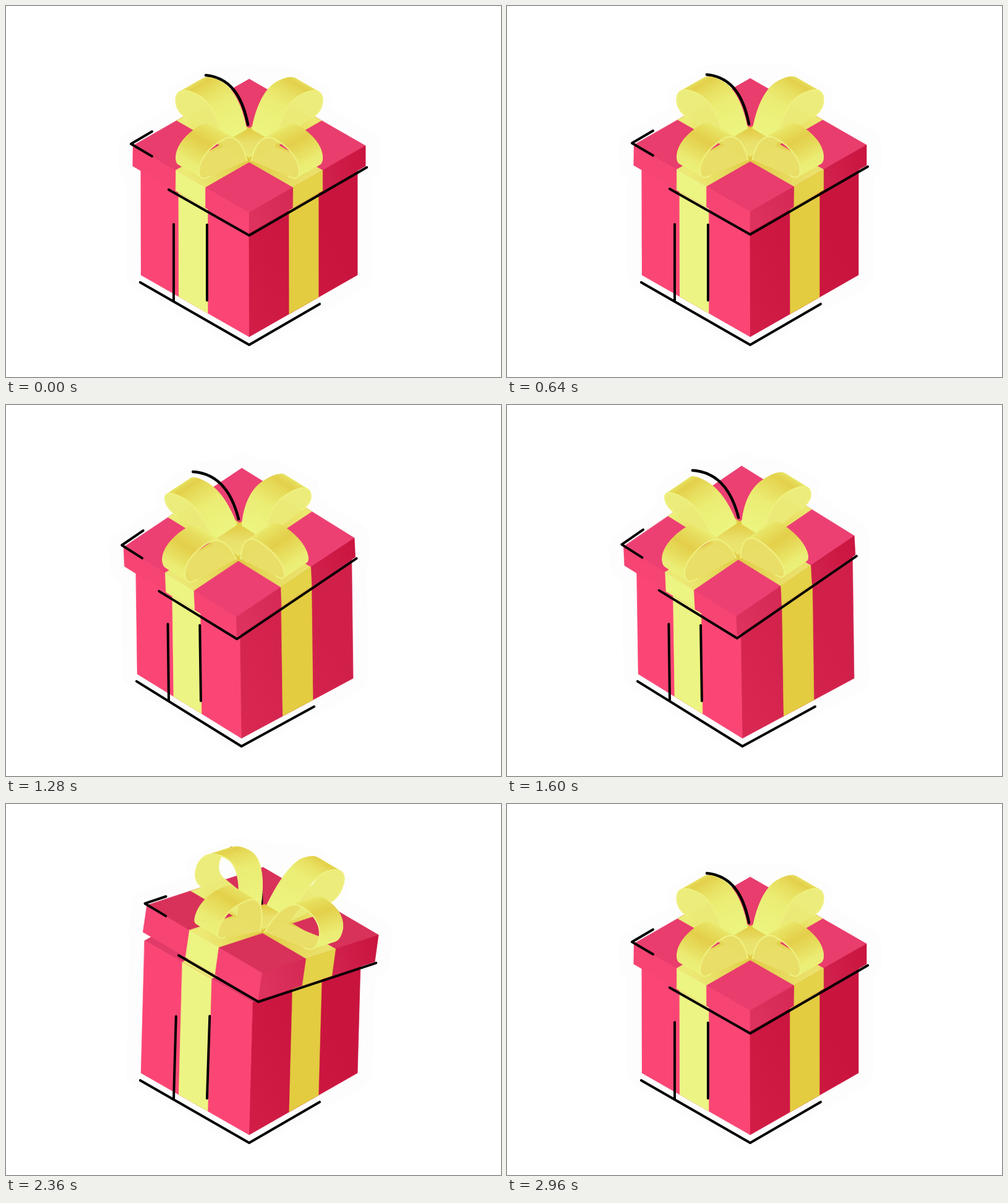
Animation of 800x600 px, one loop 3000 ms. Source, as an HTML page with a canvas:

```html
<!DOCTYPE html>
<html>
<head>
<meta charset="utf-8">
<title>Gift box</title>
<style>
html, body { margin: 0; width: 100%; height: 100%; overflow: hidden; background: #fff; }
canvas { display: block; }
</style>
</head>
<body>
<canvas id="stage" width="800" height="600"></canvas>
<script>
const ctx = document.getElementById('stage').getContext('2d');
const LOOP = 3000, STEP = 40;

// Lid pose: back corner, edge to the right, edge to the left, drop of the side, unit of height
const REST = [393, 118, 188, 108, -188, 108, 0, 33, 0, -1];
const TURN = [0, 4, -7, 5, -5, -3, 0, 0, -.05, 0];
const LIFT = [0, -68, 0, -15, 0, -10, 0, 1, -.06, 0];
const LEFT = [-12, -20, 1, 0, 2, 23, 1.5, -2, -.1, .08];
const RIGHT = [12, -7, -1, 1, 0, -31, -4, 7, .25, -.09];

const mix = (a, b, k) => a + (b - a) * k;
const ease = (t, a, b) => (1 - Math.cos(Math.PI * Math.min(1, Math.max(0, (t - a) / (b - a))))) / 2;
const bump = (t, a, peak, b) => t < peak ? ease(t, a, peak) : 1 - ease(t, peak, b);
const rgb = c => `rgb(${c.map(Math.round)})`;

function trace(points, close = true) {
  ctx.beginPath();
  points.forEach(p => ctx.lineTo(p[0], p[1]));
  if (close) ctx.closePath();
}
function fill(points, color, seam = .6) {
  trace(points);
  ctx.fillStyle = ctx.strokeStyle = color;
  ctx.lineWidth = seam;
  ctx.fill();
  ctx.stroke();
}
function line(points, color = '#000', width = 4) {
  trace(points, false);
  ctx.strokeStyle = color;
  ctx.lineWidth = width;
  ctx.stroke();
}
function gradient(p, q, ...colors) {
  const g = ctx.createLinearGradient(p[0], p[1], q[0], q[1]);
  colors.forEach((c, i) => g.addColorStop(i / (colors.length - 1), c));
  return g;
}
function bezier(a, b, c, d, n) {
  return Array.from({ length: n + 1 }, (_, i) => {
    const t = i / n, s = 1 - t;
    return a.map((_, k) => s * s * s * a[k] + 3 * s * s * t * b[k] + 3 * s * t * t * c[k] + t * t * t * d[k]);
  });
}

// Bow loop seen from the side: distance from the centre, height
const PROFILE = [
  ...bezier([.12, 0], [.15, 30], [.22, 56], [.33, 56], 24),
  ...bezier([.33, 56], [.45, 56], [.53, 45], [.53, 27], 24).slice(1),
  ...bezier([.53, 27], [.53, 16], [.5, 9], [.44, 9], 12).slice(1)
];
const OUTSIDE = [[236, 245, 128], [235, 238, 116], [228, 208, 74], [235, 238, 116], [236, 244, 128]];
function outsideColor(k) {
  const x = Math.min(k, .999) * 4, i = Math.floor(x);
  return rgb(OUTSIDE[i].map((c, n) => mix(c, OUTSIDE[i + 1][n], x - i)));
}

function stateAt(t) {
  return {
    lift: 1.06 * bump(t, 120, 400, 660),
    left: 2 * bump(t, 920, 1100, 1460) + 1.6 * bump(t, 1400, 1540, 1700) + 1.45 * bump(t, 2640, 2800, 2960),
    right: 1.8 * bump(t, 1680, 1900, 2080) + 2 * bump(t, 2200, 2440, 2680),
    turn: ease(t, 920, 1100) - ease(t, 2140, 2360)
  };
}

function lidProjector({ lift, left, right, turn }) {
  const p = REST.map((r, i) => r + turn * TURN[i] + lift * LIFT[i] + left * LEFT[i] + right * RIGHT[i]);
  const hopL = left * Math.max(0, left - 1), hopR = right * Math.max(0, right - 1);
  p[0] += 6 * hopR - 5 * hopL;
  p[1] -= 7 * hopR + 12 * hopL;
  return (u, v, h = 0) => [0, 1].map(k =>
    p[k] + u * p[2 + k] + v * p[4 + k] + (h < 0 ? -h / 33 * p[6 + k] : h * p[8 + k]));
}

function baseProjector({ left, right, turn }, flare) {
  const L = [mix(218, 212, turn), 435];
  const F = [mix(393, 380.5, turn), mix(535, 539, turn)];
  const R = [mix(568, 561, turn), mix(435, 442, turn)];
  const lean = 4 * right - 2.4 * left, height = 199 + 10 * right;
  // u runs along the left face, v along the right face back from the front corner
  return (u, v, h = 0) => [
    L[0] + u * (F[0] - L[0]) + v * (R[0] - F[0]) + h * (lean + 7.5 * flare * (u + v - 1)),
    L[1] + u * (F[1] - L[1]) + v * (R[1] - F[1]) - h * height
  ];
}

function drawHalo(lid, base) {
  const shapes = [
    [base(0, 0), base(1, 0), base(1, 1), base(1, 1, 1), base(0, 1, 1), base(0, 0, 1)],
    [lid(0, 0), lid(1, 0), lid(1, 0, -33), lid(1, 1, -33), lid(0, 1, -33), lid(0, 1)],
    [lid(-.03, .55, 25), lid(.08, .4, 50), lid(.4, .08, 50), lid(.55, -.03, 25)]
  ];
  shapes.forEach(s => fill(s, '#fdfdfd', 48));
}

function drawBase(base, turn) {
  const a = .083, b = .917;
  fill([base(0, 0, 1), base(1, 0, 1), base(1, 1, 1), base(0, 1, 1)], '#e23b69');
  fill([base(a, a, 1), base(b, a, 1), base(b, b, 1), base(a, b, 1)], '#891c49');
  fill([base(.349, 0, 1), base(.617, 0, 1), base(.617, a, 1), base(.349, a, 1)], '#ebe874');
  fill([base(1, .369, 1), base(1, .64, 1), base(b, .64, 1), base(b, .369, 1)], '#e8df66');

  const dark = [mix(201, 208, turn), mix(20, 32, turn), mix(62, 74, turn)];
  fill([base(0, 0), base(1, 0), base(1, 0, 1), base(0, 0, 1)], '#fb4675');
  fill([base(1, 0), base(1, 1), base(1, 1, 1), base(1, 0, 1)],
    gradient(base(1, 0), base(1, 1), rgb(dark.map(c => c + 9)), rgb(dark.map(c => c + 4)), rgb(dark)));
  fill([base(.349, 0), base(.617, 0), base(.617, 0, 1), base(.349, 0, 1)], '#ecf584');
  fill([base(1, .369), base(1, .64), base(1, .64, 1), base(1, .369, 1)], '#e3cc40');
}

function drawBaseLines(base) {
  const below = (p, d) => [p[0], p[1] + d];
  line([below(base(.303, 0), 12), below(base(.303, 0, .63), 13)]);
  line([below(base(.611, 0), -20), base(.611, 0, .715)]);
  line([below(base(-.006, 0), 12.5), below(base(1, 0), 13), below(base(1, .651), 12)]);
}

function drawLoop(lid, axis, sign, stretch = 1) {
  const at = (w, [d, h]) => axis ? lid(w, .5 + sign * d, h * stretch) : lid(.5 + sign * d, w, h * stretch);
  const far = PROFILE.map(p => at(.4, p)), near = PROFILE.map(p => at(.6, p));
  const n = PROFILE.length - 1, outer = [], inner = [];
  fill([far[n], near[n], near[0], far[0]], sign < 0 ? '#ebea77' : '#e9df68');
  for (let i = 0; i < n; i++) {
    const quad = [far[i], far[i + 1], near[i + 1], near[i]];
    const area = quad.reduce((sum, p, k) => {
      const q = quad[(k + 1) % 4];
      return sum + p[0] * q[1] - q[0] * p[1];
    }, 0);
    const facing = area * sign * (axis ? -1 : 1) > 0;
    (facing ? outer : inner).push([quad, i / n]);
  }
  const inside = sign < 0 ? '#ebec7a' : '#e8de66';
  inner.forEach(([quad]) => fill(quad, inside, .9));
  outer.forEach(([quad, k]) => fill(quad, outsideColor(k), .9));
  line(near, '#eff080', 2.2);
}

function drawLid(lid, { lift, left, right }) {
  const shade = lift + right;
  const top = rgb([232 - 11 * shade + 4 * left, 61 - 8 * shade + 3 * left, 109 - 13 * shade + 5 * left]);
  const a = .369, b = .622;
  fill([lid(0, 0), lid(1, 0), lid(1, 1), lid(0, 1)], top);
  fill([lid(0, 1), lid(1, 1), lid(1, 1, -33), lid(0, 1, -33)],
    gradient(lid(1, 1), lid(1, 1, -33), '#f64473', '#fb4675'));
  fill([lid(1, 1), lid(1, 0), lid(1, 0, -33), lid(1, 1, -33)],
    gradient(lid(1, 1), lid(1, 0), '#dd325e', '#d22450', '#c9143e'));

  fill([lid(a, 0), lid(b, 0), lid(b, 1), lid(a, 1)],
    gradient(lid(.5, 0), lid(.5, 1), '#ece76e', '#e0c941', '#ece974'));
  fill([lid(0, a), lid(1, a), lid(1, b), lid(0, b)],
    gradient(lid(0, .5), lid(1, .5), '#ebee78', '#e0c941', '#eae06a'));
  fill([lid(a, 1), lid(b, 1), lid(b, 1, -33), lid(a, 1, -33)], '#ecf482');
  fill([lid(1, b), lid(1, a), lid(1, a, -33), lid(1, b, -33)], '#e4d249');

  line([lid(-.024, .811), lid(-.022, .994), lid(.161, .996)]);
  line([lid(.33, 1.022, -33), lid(1.0185, 1.0185, -33), lid(1.015, .004, -33)]);
  line(bezier([.0175, .39, 50], [.14, .305, 50], [.21, .27, 25], [.3375, .348, 0], 20).map(p => lid(...p)), '#000', 4.5);

  // The rear loops sag or rise as the lid moves
  const rear = 1 - .17 * lift - .13 * left + .06 * right;
  drawLoop(lid, 0, -1, rear);
  drawLoop(lid, 1, -1, rear);
  fill([lid(.41, .41, 9), lid(.59, .41, 9), lid(.6, .6, 2), lid(.41, .59, 9)],
    gradient(lid(.41, .41, 9), lid(.6, .6, 2), '#e2c940', '#e9e06a', '#ebe873'));
  drawLoop(lid, 1, 1);
  drawLoop(lid, 0, 1);
}

function frame(now) {
  const state = stateAt(Math.floor(now % LOOP / STEP) * STEP);
  const lid = lidProjector(state), base = baseProjector(state, state.lift);
  ctx.fillStyle = '#fff';
  ctx.fillRect(0, 0, 800, 600);
  drawHalo(lid, base);
  drawBase(base, state.turn);
  drawBaseLines(baseProjector(state, 0));
  drawLid(lid, state);
}

ctx.lineCap = ctx.lineJoin = 'round';
const start = performance.now();
function tick() {
  frame(performance.now() - start);
  requestAnimationFrame(tick);
}
tick();
</script>
</body>
</html>
```
